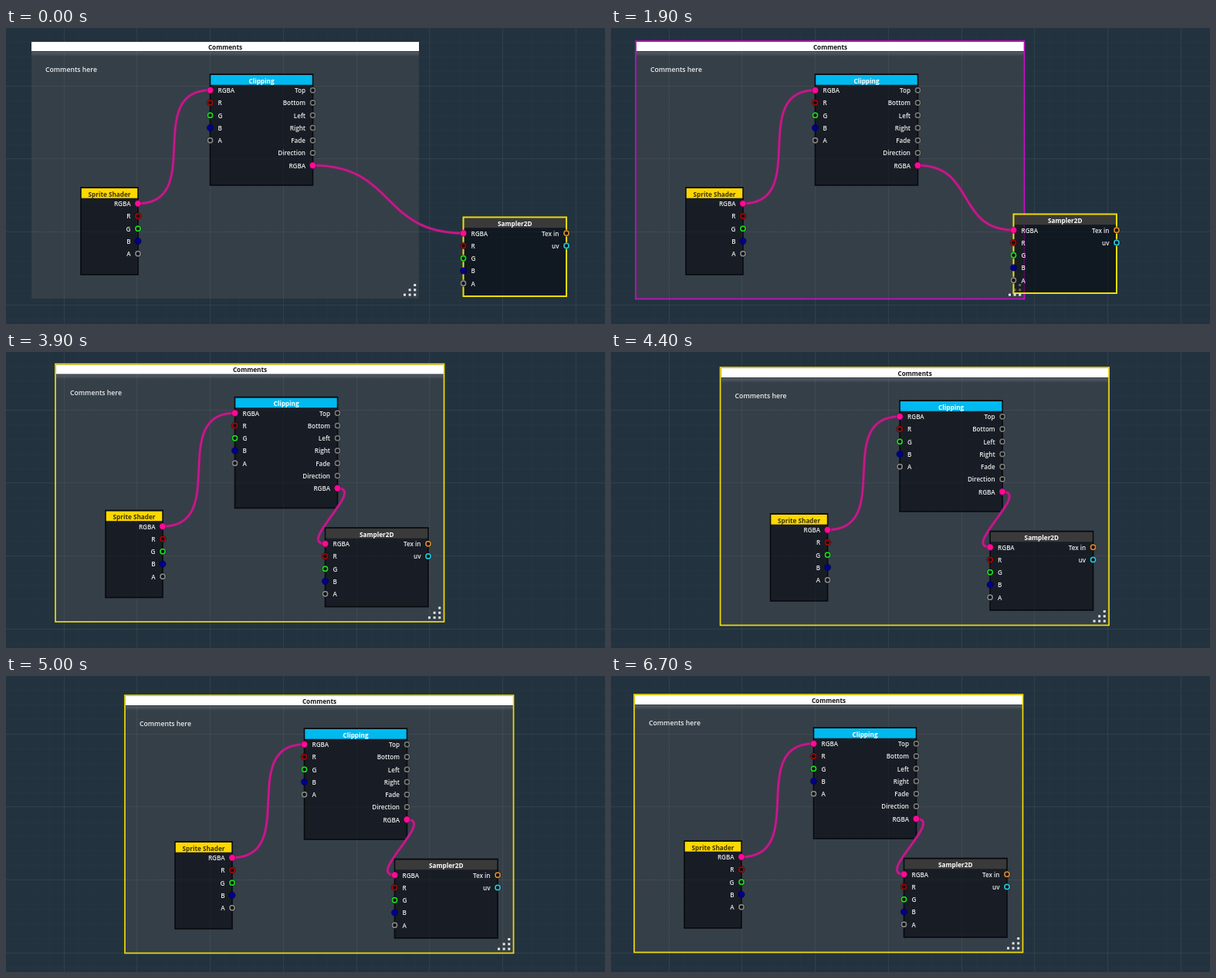
Recreate the animation shown at these times as an HTML page with a canvas. Size 776 px wide and 384 px high, loop 6800 ms.

```html
<!DOCTYPE html>
<html>
<head>
<meta charset="utf-8">
<style>
html, body { margin: 0; width: 776px; height: 384px; overflow: hidden; background: #22333f; }
canvas { display: block; }
</style>
</head>
<body>
<canvas id="stage" width="776" height="384"></canvas>
<script>
const g = document.getElementById('stage').getContext('2d');
const LOOP = 6800, STEP = 100, ROW = 16.25;
const FONT = '"Open Sans", "Noto Sans", sans-serif';
const YELLOW = '#f0dc08', MAGENTA = '#c80fc8', PINK = '#ff0a96';

// Drag paths: [ms, dx, dy]
const samplerPath = [[1400, 0, 0], [1600, -18, -1], [1900, -71, -4], [2200, -150, -11], [2500, -211, -16]];
const groupPath = [[3500, 0, 0], [3700, 10, -1], [3900, 32, -1.5], [4200, 82, 0], [4400, 109.6, 3],
  [4600, 152, 9], [4700, 160, 10], [5000, 122, 8], [5300, 52, 8], [5600, -2, 7]];

const rgba = [['RGBA', PINK, 1], ['R', '#a40808'], ['G', '#1ed81e'], ['B', '#00008a', 1], ['A', '#858585']];
const grey = name => [name, '#787878'];
const sprite = { title: 'Sprite Shader', x: 97, y: 207, w: 74, h: 113, bar: '#ffd800', ink: '#3a3206', left: [], right: rgba };
const clipping = { title: 'Clipping', x: 264.5, y: 60, w: 133, h: 144, bar: '#00b9ee', ink: '#fff', left: rgba,
  right: [...['Top', 'Bottom', 'Left', 'Right', 'Fade', 'Direction'].map(grey), rgba[0]] };
const sampler = { title: 'Sampler2D', x: 592.5, y: 245.5, w: 133.5, h: 102.5, bar: '#3a3a3a', ink: '#fff', left: rgba,
  right: [['Tex in', '#d8862e'], ['uv', '#27c4dc']] };

function along(path, t) {
  if (t <= path[0][0]) return [0, 0];
  for (let i = 1; i < path.length; i++) {
    const [t0, x0, y0] = path[i - 1], [t1, x1, y1] = path[i];
    if (t < t1) {
      const k = (t - t0) / (t1 - t0);
      return [x0 + (x1 - x0) * k, y0 + (y1 - y0) * k];
    }
  }
  return path[path.length - 1].slice(1);
}

function rect(x, y, w, h, color) {
  g.fillStyle = color;
  g.fillRect(x, y, w, h);
}

function frame(x, y, w, h, color, width) {
  g.strokeStyle = color;
  g.lineWidth = width;
  g.strokeRect(x, y, w, h);
}

function text(s, x, y, color, size, align, weight = 600) {
  g.font = `${weight} ${size}px ${FONT}`;
  g.textAlign = align;
  g.fillStyle = color;
  g.fillText(s, x, y);
}

function port(x, y, color, filled) {
  g.beginPath();
  g.arc(x, y, filled ? 4.2 : 3.1, 0, 7);
  g.fillStyle = filled ? color : '#10151a';
  g.fill();
  const ring = filled ? [['rgba(0,0,0,.4)', 0.8]] : [['rgba(0,0,0,.5)', 3.2], [color, 1.7]];
  for (const [style, width] of ring) {
    g.strokeStyle = style;
    g.lineWidth = width;
    g.stroke();
  }
}

const portY = (n, i) => n.y + 20.7 + ROW * i;

function node(n, selected) {
  rect(n.x, n.y, n.w, n.h, 'rgba(3,5,12,.57)');
  rect(n.x, n.y + 1, n.w, 12.7, n.bar);
  if (selected) frame(n.x, n.y, n.w, n.h, YELLOW, 2);
  else frame(n.x, n.y, n.w, n.h, 'rgba(5,7,10,.9)', 1.6);
  text(n.title, n.x + n.w / 2, n.y + 11.6, n.ink, 8.2, 'center', 700);
  const side = (ports, x, dx, align) => ports.forEach(([name, color, filled], i) => {
    const y = portY(n, i);
    port(x, y, color, filled);
    text(name, x + dx, y + 3.3, '#ececec', 8.1, align);
  });
  side(n.left, n.x, 10, 'left');
  side(n.right, n.x + n.w, -9.5, 'right');
}

function wire(from, i, to) {
  const x0 = from.x + from.w, y0 = portY(from, i), x1 = to.x, y1 = portY(to, 0);
  const pull = Math.hypot(x1 - x0, y1 - y0) / 2;
  g.beginPath();
  g.moveTo(x0, y0);
  g.bezierCurveTo(x0 + pull, y0, x1 - pull, y1, x1, y1);
  for (const [color, width] of [['rgba(150,25,110,.55)', 4.2], ['#c41a8a', 2.6]]) {
    g.strokeStyle = color;
    g.lineWidth = width;
    g.stroke();
  }
}

function grid() {
  rect(0, 0, 776, 384, '#22333f');
  const lines = (gap, start, color) => {
    for (let p = start; p < 776; p += gap) {
      rect(Math.round(p), 0, 1, 384, color);
      if (p < 384) rect(0, Math.round(p), 776, 1, color);
    }
  };
  lines(18.95, 18, 'rgba(255,255,255,.012)');
  lines(94.75, 74.5, 'rgba(255,255,255,.055)');
}

function panel(x, y, border) {
  rect(x + 1, y + 1, 502, 333, 'rgba(130,110,110,.2)');
  const shade = g.createLinearGradient(0, y + 13, 0, y + 20);
  shade.addColorStop(0, 'rgba(220,225,230,.22)');
  shade.addColorStop(1, 'rgba(220,225,230,0)');
  rect(x + 1, y + 13, 502, 7, shade);
  rect(x + 1, y + 13, 502, 1, 'rgba(20,28,34,.6)');
  rect(x + 1, y + 1, 502, 12, '#fff');
  if (border) frame(x, y, 503.5, 334.5, border, 1.7);
  text('Comments', x + 252, y + 10.5, '#111', 8.2, 'center', 700);
  text('Comments here', x + 19, y + 40, '#eee', 8.7, 'left');
  for (let r = 0; r < 3; r++)
    for (let c = 2 - r; c < 3; c++) rect(x + 483 + c * 6.6, y + 315 + r * 6.3, 3, 3, '#e4e6e8');
}

function draw(t) {
  const [gx, gy] = along(groupPath, t), [sx, sy] = along(samplerPath, t);
  const move = (n, dx, dy) => ({ ...n, x: n.x + dx, y: n.y + dy });
  const a = move(sprite, gx, gy), b = move(clipping, gx, gy), c = move(sampler, gx + sx, gy + sy);
  const grouped = t >= 3200;
  grid();
  panel(32 + gx, 17 + gy, grouped ? YELLOW : c.x < 536 ? MAGENTA : null);
  wire(a, 0, b);
  node(a);
  node(b);
  wire(b, 6, c);
  port(b.x + b.w, portY(b, 6), PINK, 1);
  node(c, !grouped);
}

function tick() {
  draw(Math.floor(performance.now() % LOOP / STEP) * STEP);
  requestAnimationFrame(tick);
}
tick();
</script>
</body>
</html>
```
